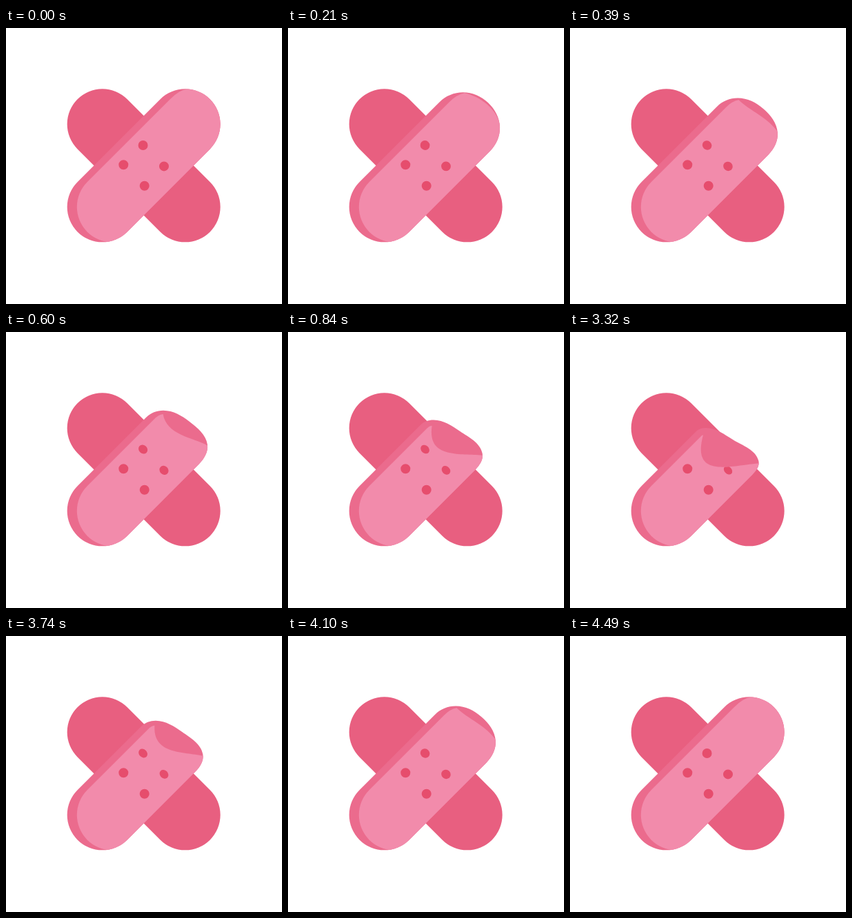
These frames come from a looping animation (400x400 px, 5.52 s). An HTML page with a canvas:

```html
<!DOCTYPE html>
<html lang="en">
<head>
<meta charset="utf-8">
<title>Bandage</title>
<style>
  html, body { margin: 0; width: 100%; height: 100%; overflow: hidden; background: #fff; }
  canvas { display: block; width: 400px; height: 400px; }
</style>
</head>
<body>
<canvas id="stage"></canvas>
<script>
const LOOP = 5520, STEP = 30, PEEL = 1200, BACK = 3320;
const BASE = '#e85f80', EDGE = '#eb6b8d', LIGHT = '#f28bab', DOT = '#e64d6d';
const R = 51, HALF = 60 * Math.SQRT2, SHADE = 10;

const canvas = document.getElementById('stage');
const ctx = canvas.getContext('2d');
const dpr = window.devicePixelRatio || 1;
canvas.width = canvas.height = 400 * dpr;

// Coordinates start at the crossing; x runs along the top strip.
const flatEnd = [-2, -1, 0, 1, 2].map(k => {
  const a = k * Math.PI / 4;
  return [HALF + R * Math.cos(a), R * Math.sin(a)];
});
const peeledEnd = [[27, -R], [40.5, -44.5], [56, -5], [60.5, 43.5], [40, R]];

// Fold line: a small corner curve, then one long curve across.
const flatFold = [[95, -41], [113, -41], [123, -34], [143, -15], [143, 16], [122, 37]];
const peeledFold = [[28.5, -41], [29.5, -41], [30, -40], [-26, -8], [23, 17], [58.5, 46]];

const mix = (a, b, e) => a + (b - a) * e;
const blend = (from, to, e) => from.map((p, i) => p.map((v, j) => mix(v, to[i][j], e)));
const ease = p => mix(p, p * p * (3 - 2 * p), 0.85);

function unit([x, y]) {
  const d = Math.hypot(x, y);
  return [x / d, y / d];
}

// Smooth curve through the points, leaving and joining the straight sides.
function spline(path, pts) {
  const chords = pts.slice(1).map((p, i) => [p[0] - pts[i][0], p[1] - pts[i][1]]);
  const dirs = chords.map(unit);
  const tangents = pts.map((_, i) => {
    if (i === 0) return [1, 0];
    if (i === dirs.length) return [-1, 0];
    return unit([dirs[i - 1][0] + dirs[i][0], dirs[i - 1][1] + dirs[i][1]]);
  });
  path.moveTo(...pts[0]);
  chords.forEach((c, i) => {
    const k = 0.346 * Math.hypot(...c);
    const [a, b] = [pts[i], pts[i + 1]], [s, t] = [tangents[i], tangents[i + 1]];
    path.bezierCurveTo(a[0] + k * s[0], a[1] + k * s[1], b[0] - k * t[0], b[1] - k * t[1], ...b);
  });
}

function outline(e) {
  const p = new Path2D();
  spline(p, blend(flatEnd, peeledEnd, e));
  p.arc(-HALF, 0, R, Math.PI / 2, Math.PI * 3 / 2);
  p.closePath();
  return p;
}

function face(e) {
  const [side, corner, tip, c1, c2, end] = blend(flatFold, peeledFold, e);
  const p = new Path2D();
  p.moveTo(...side);
  p.quadraticCurveTo(...corner, ...tip);
  p.bezierCurveTo(...c1, ...c2, ...end);
  p.lineTo(end[0] + 20, end[1] + 20);
  p.arc(SHADE - HALF, SHADE, R, Math.PI / 2, Math.PI * 3 / 2);
  p.closePath();
  return p;
}

function draw(e) {
  ctx.setTransform(dpr, 0, 0, dpr, 0, 0);
  ctx.fillStyle = '#fff';
  ctx.fillRect(0, 0, 400, 400);
  ctx.translate(199.65, 199.35);
  ctx.rotate(-Math.PI / 4);

  ctx.strokeStyle = BASE;
  ctx.lineWidth = 2 * R;
  ctx.lineCap = 'round';
  ctx.beginPath();
  ctx.moveTo(0, -HALF);
  ctx.lineTo(0, HALF);
  ctx.stroke();

  const body = outline(e), front = face(e);
  ctx.fillStyle = EDGE;
  ctx.fill(body);
  ctx.save();
  ctx.clip(body);
  ctx.fillStyle = LIGHT;
  ctx.fill(front);
  ctx.clip(front);
  ctx.fillStyle = DOT;
  for (const x of [-20, 20]) {
    for (const y of [-21.5, 21.5]) {
      ctx.beginPath();
      ctx.ellipse(x, y, x > 0 ? 7 - 1.8 * e : 7, 7, 0, 0, Math.PI * 2);
      ctx.fill();
    }
  }
  ctx.restore();
}

function peelAt(ms) {
  const t = ms % LOOP;
  const held = n => Math.floor(n / STEP) * STEP;
  const p = t < BACK ? Math.min(PEEL, held(t)) : Math.max(0, PEEL - STEP - held(t - BACK));
  return p / PEEL;
}

const start = performance.now();
function tick() {
  draw(ease(peelAt(performance.now() - start)));
  requestAnimationFrame(tick);
}
tick();
</script>
</body>
</html>
```
